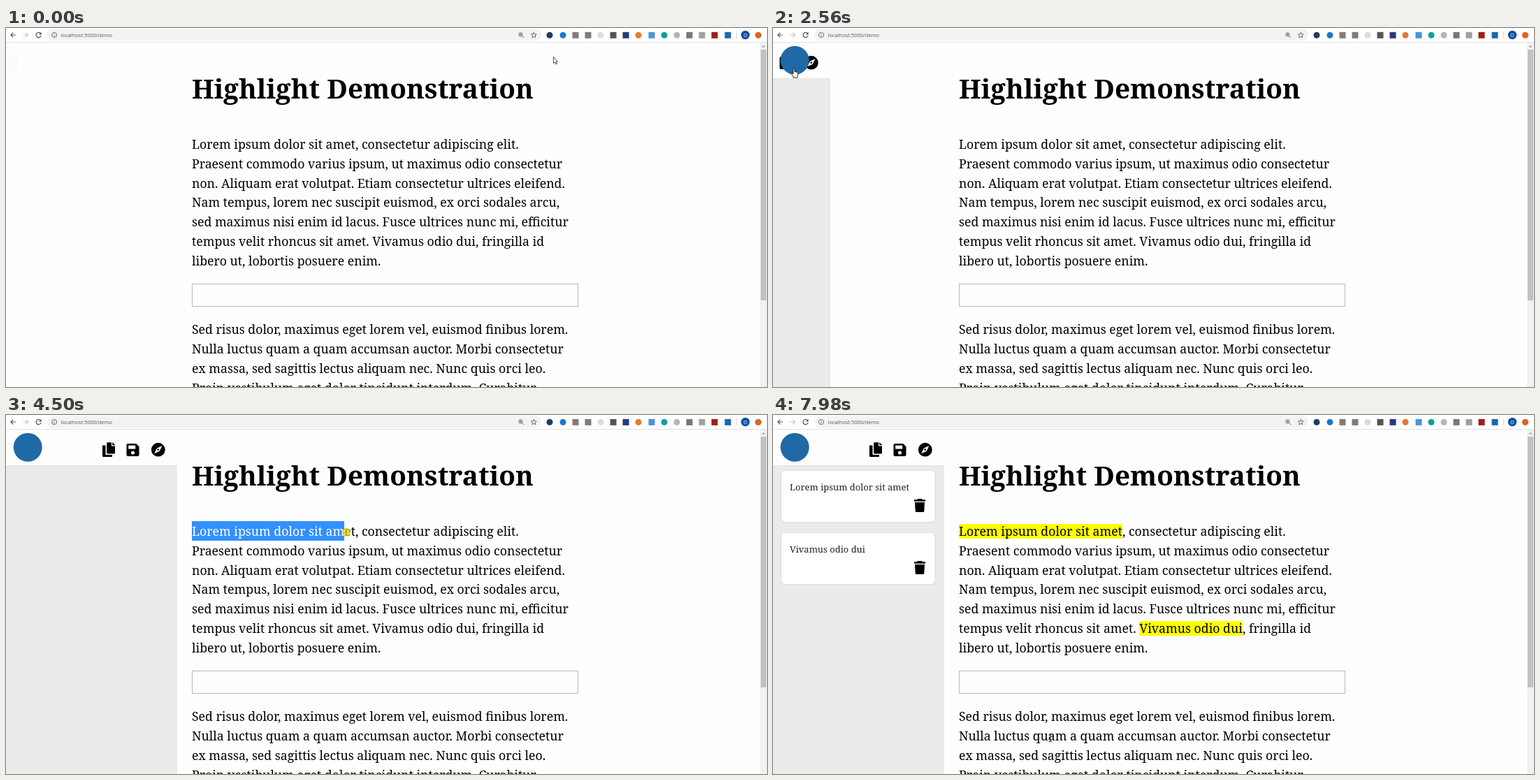
An HTML page with a canvas that plays this animation: 1089 px wide and 514 px high, repeating every 8000 ms.

```html
<!DOCTYPE html>
<html lang="en">
<head>
<meta charset="utf-8">
<title>Highlight Demonstration</title>
<style>
html, body { margin: 0; width: 100%; height: 100%; overflow: hidden; background: #fefefe; }
canvas { display: block; width: 1089px; height: 514px; }
</style>
</head>
<body>
<canvas id="stage"></canvas>
<script>
const W = 1089, H = 514, LOOP = 8000;
const canvas = document.getElementById('stage');
const ctx = canvas.getContext('2d');
const dpr = window.devicePixelRatio || 1;
canvas.width = W * dpr;
canvas.height = H * dpr;

const SERIF = '"Noto Serif", "DejaVu Serif", serif';
const SANS = '"Open Sans", "Noto Sans", sans-serif';
const PAGE = '#fefefe', INK = '#000', LEFT = 266;

const lines = [
  'Lorem ipsum dolor sit amet, consectetur adipiscing elit.',
  'Praesent commodo varius ipsum, ut maximus odio consectetur',
  'non. Aliquam erat volutpat. Etiam consectetur ultrices eleifend.',
  'Nam tempus, lorem nec suscipit euismod, ex orci sodales arcu,',
  'sed maximus nisi enim id lacus. Fusce ultrices nunc mi, efficitur',
  'tempus velit rhoncus sit amet. Vivamus odio dui, fringilla id',
  'libero ut, lobortis posuere enim.',
  'Sed risus dolor, maximus eget lorem vel, euismod finibus lorem.',
  'Nulla luctus quam a quam accumsan auctor. Morbi consectetur',
  'ex massa, sed sagittis lectus aliquam nec. Nunc quis orci leo.',
  'Proin vestibulum eget dolor tincidunt interdum. Curabitur'
];
const baseline = i => Math.round((i < 7 ? 172.8 : 243.4) + i * 27.85);

// One font size per style, taken from the column measure.
function sizeFor(weight, sample, measure) {
  ctx.font = `${weight} 100px ${SERIF}`;
  return 100 * measure / ctx.measureText(sample).width;
}
const bodySize = sizeFor(400, lines[0], 468);
const bodyFont = `${bodySize}px ${SERIF}`;
const noteFont = `${bodySize * 0.732}px ${SERIF}`;
const titleFont = `700 ${sizeFor(700, 'Highlight Demonstration', 489)}px ${SERIF}`;

const marks = [
  { line: 0, text: 'Lorem ipsum dolor sit amet', down: 3960, up: 5200, card: 80 },
  { line: 5, text: 'Vivamus odio dui', down: 6120, up: 7280, card: 169 }
];
for (const m of marks) {
  const s = lines[m.line];
  ctx.font = bodyFont;
  m.x = LEFT + ctx.measureText(s.slice(0, s.indexOf(m.text))).width;
  m.edges = [...m.text].map((c, i) => m.x + ctx.measureText(m.text.slice(0, i + 1)).width);
  m.edges.unshift(m.x);
}

// Pointer path: time, x, y
const path = [
  [0, 783, 41], [330, 783, 41], [1100, 780, 9], [1360, 780, 9],
  [1950, 108, 66], [2180, 31, 60], [2260, 30, 58], [2660, 30, 58],
  [3020, 255, 160], [3130, 255, 160], [3340, 271, 166], [3500, 271, 166],
  [3730, 270, 166], [3900, 268, 166], [4500, 487, 168], [4730, 497, 168],
  [4800, 500, 168], [5290, 500, 168], [5600, 538, 250], [5890, 528, 308],
  [6200, 528, 308], [6580, 657, 308], [6900, 672, 308], [7220, 672, 308],
  [7980, 397, 463]
];

function pointer(t) {
  let i = 0;
  while (i < path.length - 2 && t >= path[i + 1][0]) i++;
  const [t0, x0, y0] = path[i], [t1, x1, y1] = path[i + 1];
  const p = Math.min(1, (t - t0) / (t1 - t0));
  const e = p * p * (3 - 2 * p);
  return [x0 + (x1 - x0) * e, y0 + (y1 - y0) * e];
}

// CSS "ease": cubic-bezier(.25, .1, .25, 1)
function ease(x) {
  if (x <= 0) return 0;
  if (x >= 1) return 1;
  let lo = 0, hi = 1, s = 0.5;
  for (let i = 0; i < 20; i++) {
    s = (lo + hi) / 2;
    const bx = 0.75 * s * (1 - s) + s ** 3;
    if (bx < x) lo = s; else hi = s;
  }
  return 0.3 * s * (1 - s) ** 2 + 3 * s * s * (1 - s) + s ** 3;
}

function rect(x, y, w, h, color) {
  ctx.fillStyle = color;
  ctx.fillRect(x, y, w, h);
}
function disc(x, y, r, color) {
  ctx.beginPath();
  ctx.arc(x, y, r, 0, Math.PI * 2);
  ctx.fillStyle = color;
  ctx.fill();
}
function round(x, y, w, h, r, color) {
  ctx.beginPath();
  ctx.roundRect(x, y, w, h, r);
  ctx.fillStyle = color;
  ctx.fill();
}
function shape(d, fill, stroke, width = 1) {
  const p = new Path2D(d);
  if (fill) { ctx.fillStyle = fill; ctx.fill(p); }
  if (stroke) { ctx.strokeStyle = stroke; ctx.lineWidth = width; ctx.stroke(p); }
}
function text(s, x, y, font, color) {
  ctx.font = font;
  ctx.fillStyle = color;
  ctx.fillText(s, x, y);
}
function at(x, y, draw) {
  ctx.save();
  ctx.translate(x, y);
  draw();
  ctx.restore();
}

// Toolbar badges: x, colour, round
const badges = [
  [778, '#1b3f63', 1], [797, '#1a78cc', 1], [815, '#8c7a70', 0], [833, '#7c7c7c', 0],
  [851, '#dcdcdc', 1], [869, '#555', 0], [887, '#263c78', 0], [905, '#e37a35', 1],
  [924, '#4a95d6', 0], [942, '#159ba6', 1], [960, '#b5b5b5', 1], [978, '#777', 0],
  [996, '#a0a0a0', 0], [1014, '#a31c1c', 0], [1033, '#1868b4', 0]
];

function toolbar() {
  rect(0, 0, W, 20, '#fff');
  rect(0, 20, W, 1, '#e2e2e2');
  round(59, 1.5, 707, 17, 8.5, '#f1f3f4');
  shape('M14 10H7M10.3 6.6L6.9 10l3.4 3.4', null, '#505358', 1.2);
  shape('M24.5 10h7M28.2 6.6l3.4 3.4-3.4 3.4', null, '#c4c6c9', 1.2);
  shape('M49.4 7.6A3.6 3.6 0 1 0 50.1 11', null, '#505358', 1.2);
  shape('M50.7 5.9v3.7h-3.7z', '#505358');
  shape('M72.7 10a3.6 3.6 0 1 1-7.2 0a3.6 3.6 0 1 1 7.2 0M69.1 9.5v2.7M69.1 7.8v.9', null, '#5f6368', 0.9);
  text('localhost:5000/demo', 78.5, 13, `7.5px ${SANS}`, '#55585c');
  shape('M739 9.3a2.6 2.6 0 1 1-5.2 0a2.6 2.6 0 1 1 5.2 0M738.3 11.3l2.8 2.8M735 9.3h2.8M736.4 7.9v2.8', null, '#55585c', 0.9);
  shape('M755.3 6.2l1.1 2.6 2.8.2-2.1 1.9.6 2.8-2.4-1.5-2.4 1.5.6-2.8-2.1-1.9 2.8-.2z', null, '#55585c', 0.9);
  for (const [x, color, isRound] of badges) {
    if (isRound) disc(x, 10.3, 4.5, color);
    else rect(x - 4.5, 5.8, 9, 9, color);
  }
  rect(1045, 5, 1, 10, '#d8dade');
  disc(1058, 10, 6.2, '#0d52a0');
  ctx.textAlign = 'center';
  text('O', 1058, 12.6, `7px ${SANS}`, '#fff');
  ctx.textAlign = 'left';
  disc(1076.5, 10.3, 4.6, '#df6427');
}

function scrollbar() {
  rect(1079, 21, 10, H - 21, '#f1f1f1');
  rect(1080, 31, 8, 359, '#c1c1c1');
  shape('M1081.5 27.5l2.5-2.8 2.5 2.8z', '#a3a3a3');
}

function field(t) {
  const focused = t >= 1100 && t < 2410;
  ctx.lineWidth = focused ? 1.5 : 1;
  ctx.strokeStyle = focused ? '#5e98ee' : '#b9b9b9';
  if (focused) ctx.strokeRect(266, 366, 553, 32.5);
  else ctx.strokeRect(266.5, 366.5, 552, 32);
  if (focused && (t - 1100) % 1000 < 500) rect(271, 371, 1, 22, INK);
}

function selection(m, x) {
  const end = m.edges.reduce((a, b) => Math.abs(b - x) < Math.abs(a - x) ? b : a);
  const y = baseline(m.line);
  if (end <= m.x) return;
  ctx.save();
  ctx.beginPath();
  ctx.rect(m.x, y - 21, end - m.x, 28);
  ctx.clip();
  rect(m.x, y - 21, end - m.x, 28, '#3390ff');
  text(lines[m.line], LEFT, y, bodyFont, '#fff');
  ctx.restore();
}

function article(t, x) {
  text('Highlight Demonstration', LEFT, 101, titleFont, INK);
  for (const m of marks) {
    if (t >= m.up) rect(m.x, baseline(m.line) - 17, m.edges.at(-1) - m.x, 21, '#ff0');
  }
  lines.forEach((s, i) => text(s, LEFT, baseline(i), bodyFont, INK));
  for (const m of marks) {
    if (t >= m.down && t < m.up) selection(m, x);
  }
  field(t);
}

function trash(x, y) {
  at(x, y, () => {
    shape('M5 0h6l1 1.3h4v2.5H0V1.3h4z', INK);
    shape('M1 5h14l-.7 12.4q-.1 1.6-1.7 1.6H3.4q-1.6 0-1.7-1.6z', INK);
  });
}

function card(m) {
  at(0, m.card, () => {
    round(11, -0.5, 221.5, 75, 6, '#d9d9d9');
    round(12, 0, 219.5, 73.2, 5, '#fff');
    text(m.text, 24, 27.5, noteFont, '#222');
    trash(202, 40);
  });
}

function panelIcons() {
  // copy
  shape('M138 43.5h4.5v12.5q0 1 1 1H152v2q0 1-1 1H139.3q-1.3 0-1.3-1.3z', INK);
  shape('M145.2 39.2H151v5.3h5v10q0 1-1 1H145.2q-1 0-1-1V40.2q0-1 1-1z', INK);
  shape('M152.2 39.2h.4l3.4 3.6v.5h-3.8z', INK);
  // save
  shape('M174.5 41h11.7l4.3 4.3v11.7q0 2-2 2H174.5q-2 0-2-2V43q0-2 2-2z', INK);
  rect(175.2, 43.6, 10, 5, PAGE);
  disc(181.5, 54, 2.5, PAGE);
  // compass
  disc(217.8, 49.7, 9.9, INK);
  shape('M223.4 44.1l-3.6 7.6-7.6 3.6 3.6-7.6z', PAGE);
  disc(217.8, 49.7, 1.4, INK);
}

function panel(t) {
  const open = ease((t - 2452) / 500);
  if (open > 0) {
    at(Math.round(245 * (open - 1)), 0, () => {
      rect(0, 21, 245, 52, PAGE);
      rect(0, 72, 245, H - 72, '#ebebeb');
      rect(0, 72, 245, 1, '#e3e3e3');
      panelIcons();
      for (const m of marks) if (t >= m.up) card(m);
    });
  }
  if (t >= 1270) disc(31.2, 46.2, 20.5, '#1f69a6');
  else {
    rect(0, 21, 13, 51, '#fcfcfc');
    rect(14, 46, 1, 11, '#ececec');
  }
}

function cursor(t, x, y) {
  const held = marks.some(m => t >= m.down && t < m.up);
  if (held) disc(x, y, 6, 'rgba(236, 222, 20, 0.8)');
  at(x, y, () => {
    if (t >= 3270) {
      const color = held ? 'rgba(110, 105, 20, 0.5)' : '#222';
      shape('M-2.5-4.8H-.8L0-4.2.8-4.8H2.5M0-4.2V4.2M-2.5 4.8H-.8L0 4.2.8 4.8H2.5', null, color, 0.9);
    } else if (t >= 2150 && t < 2710) {
      shape('M-1 0Q0-1 1 0V4.5L5 5.4Q6 5.8 6 7L5 11V13H-1V11.2L-4 7.6Q-4 6.2-2.8 6.6L-1 8z', '#fff', '#111', 0.9);
    } else {
      shape('M.4.4V9.6L2.5 7.8 4 11 5.4 10.4 4 7.3H6.4z', '#fff', '#222', 0.8);
    }
  });
}

function draw(t) {
  const [x, y] = pointer(t);
  ctx.setTransform(dpr, 0, 0, dpr, 0, 0);
  rect(0, 0, W, H, PAGE);
  article(t, x);
  panel(t);
  scrollbar();
  toolbar();
  cursor(t, x, y);
}

const start = performance.now();
function tick() {
  draw((performance.now() - start) % LOOP);
  requestAnimationFrame(tick);
}
tick();
</script>
</body>
</html>
```
